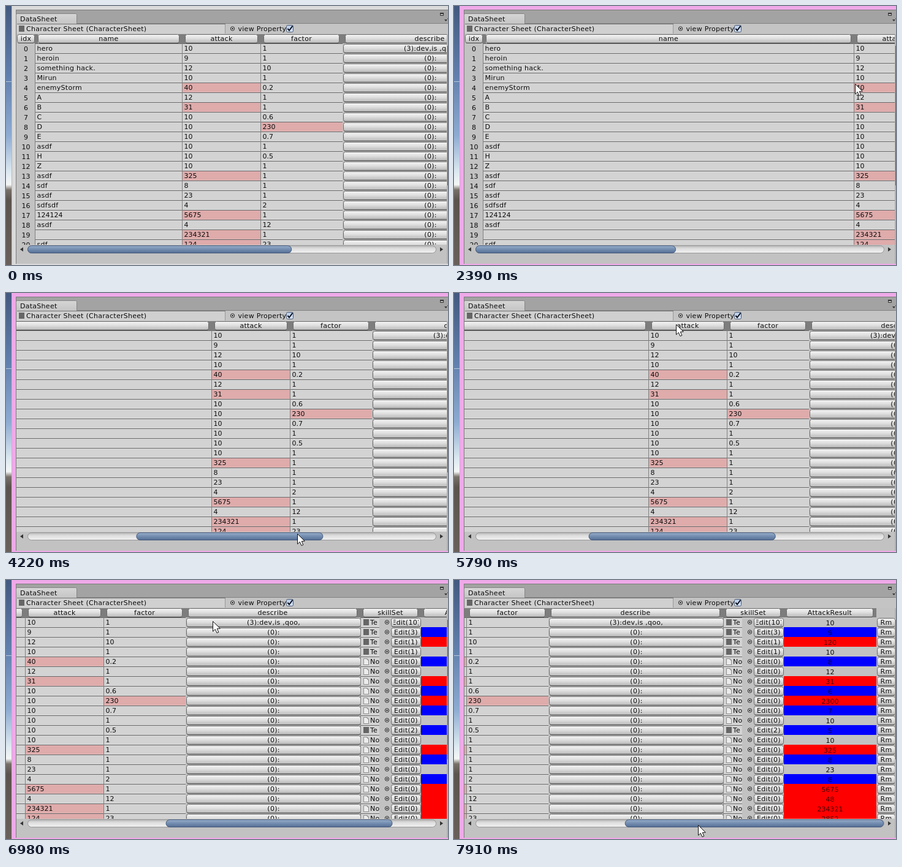
Recreate the animation shown at these times as an HTML page with a canvas. Size 721 by 423 pixels, loop 8000 ms.

```html
<!DOCTYPE html>
<html lang="en">
<head>
<meta charset="utf-8">
<title>DataSheet</title>
<style>
  html, body { margin: 0; width: 100%; height: 100%; overflow: hidden; background: #c2c2c2; }
  canvas { display: block; }
</style>
</head>
<body>
<canvas id="stage" width="721" height="423"></canvas>
<script>
const ctx = document.getElementById('stage').getContext('2d');
const LOOP = 8000, FOCUS_AT = 1400;
const VIEW = { x: 17, right: 719, top: 45, bottom: 390, w: 702 };
const ROW = 16, LIMIT = 30;
const GREY = '#c2c2c2', INK = '#0c0c0c';

// name, attack, factor, number of skills
const rows = [
  ['hero', 10, 1, 10], ['heroin', 9, 1, 3], ['something hack.', 12, 10, 1],
  ['Mirun', 10, 1, 1], ['enemyStorm', 40, 0.2, 0], ['A', 12, 1, 0],
  ['B', 31, 1, 0], ['C', 10, 0.6, 0], ['D', 10, 230, 0], ['E', 10, 0.7, 0],
  ['asdf', 10, 1, 0], ['H', 10, 0.5, 2], ['Z', 10, 1, 0], ['asdf', 325, 1, 0],
  ['sdf', 8, 1, 0], ['asdf', 23, 1, 0], ['sdfsdf', 4, 2, 0],
  ['124124', 5675, 1, 0], ['asdf', 4, 12, 0], ['', 234321, 1, 0], ['sdf', 124, 23, 0]
];

// time, extra width of the name column
const widthKeys = [
  [2000, 0], [2570, 476], [5790, 476], [6180, 239], [6830, 239], [7220, 109], [7450, 24]
];
// time, horizontal scroll
const scrollKeys = [[4000, 0], [4250, 445]];
// time, pointer x, y
const pointerKeys = [
  [0, 594, 440], [39, 594, 440], [40, 594, 391], [560, 302, 33], [810, 282, 51],
  [990, 282, 51], [1020, 284, 51], [1170, 284, 51], [1210, 277, 43], [1250, 286, 52],
  [1999, 286, 52], [2000, 289, 53], [2570, 765, 150],
  [3209, 765, 150], [3210, 697, 178], [3490, 340, 392], [3600, 318, 406], [3770, 312, 397],
  [4000, 312, 397], [4250, 496, 393], [4500, 496, 393], [4860, 300, 40],
  [5010, 300, 40], [5080, 315, 56], [5240, 315, 56], [5470, 320, 53],
  [5789, 320, 53], [5790, 363, 51], [6180, 126, 58], [6370, 387, 65],
  [6830, 387, 65], [7220, 257, 71], [7450, 172, 73], [7610, 264, 208],
  [7660, 270, 220], [7910, 398, 400]
];

const smooth = p => p * p * (3 - 2 * p);
const linear = p => p;

function sample(keys, t, ease) {
  if (t <= keys[0][0]) return keys[0].slice(1);
  const n = keys.findIndex(k => k[0] > t);
  if (n < 0) return keys[keys.length - 1].slice(1);
  const a = keys[n - 1], b = keys[n];
  const p = ease((t - a[0]) / (b[0] - a[0]));
  return a.slice(1).map((v, i) => v + (b[i + 1] - v) * p);
}

function rect(x, y, w, h, fill) {
  ctx.fillStyle = fill;
  ctx.fillRect(x, y, w, h);
}

function gradient(y, h, stops) {
  const g = ctx.createLinearGradient(0, y, 0, y + h);
  stops.forEach(([p, c]) => g.addColorStop(p, c));
  return g;
}

function box(x, y, w, h, r, fill, stroke) {
  ctx.beginPath();
  ctx.roundRect(x + .5, y + .5, w - 1, h - 1, r);
  ctx.fillStyle = fill;
  ctx.fill();
  ctx.strokeStyle = stroke;
  ctx.lineWidth = 1;
  ctx.stroke();
}

function poly(points, fill) {
  ctx.beginPath();
  points.forEach(([x, y]) => ctx.lineTo(x, y));
  ctx.closePath();
  ctx.fillStyle = fill;
  ctx.fill();
}

function text(str, x, y, align = 'left', color = INK) {
  str = String(str);
  ctx.font = '11px "DejaVu Sans", sans-serif';
  ctx.letterSpacing = /[a-z(]/i.test(str) ? '0.27px' : '0px';
  ctx.textAlign = align;
  ctx.fillStyle = color;
  ctx.fillText(str, x, y);
}

function clipped(x, y, w, h, draw) {
  ctx.save();
  ctx.beginPath();
  ctx.rect(x, y, w, h);
  ctx.clip();
  draw();
  ctx.restore();
}

function button(x, y, w, label) {
  const face = gradient(y, 15, [[0, '#f6f6f6'], [.45, '#e0e0e0'], [1, '#b4b4b4']]);
  box(x, y, w, 15, 3, face, '#6a6a6a');
  rect(x + 2, y + 14, w - 4, 1, '#454545');
  clipped(x + 4, y, w - 8, 15, () => text(label, x + w / 2, y + 11, 'center'));
}

function ring(x, y) {
  ctx.beginPath();
  ctx.arc(x, y, 3.2, 0, 7);
  ctx.strokeStyle = '#2a2a2a';
  ctx.lineWidth = 1;
  ctx.stroke();
  rect(x - 1, y - 1, 2, 2, '#111');
}

function field(x, y, w, value) {
  rect(x, y, w, ROW, value > LIMIT ? '#dfabab' : '#d3d3d3');
  rect(x, y - 1, w, 1, '#686868');
  rect(x, y + ROW - 2, w, 1, value > LIMIT ? '#e6b9b9' : '#dcdcdc');
  rect(x - 1, y - 1, 1, ROW, '#808080');
  text(value, x + 2.5, y + 11);
}

function skillCell(x, y, count) {
  field(x + 1, y, 30, '');
  if (count) rect(x + 5, y + 2, 9, 10, '#666');
  else {
    poly([[x + 5, y + 2], [x + 11, y + 2], [x + 14, y + 5], [x + 14, y + 13], [x + 5, y + 13]], '#8f8f8f');
    poly([[x + 6, y + 3], [x + 10, y + 3], [x + 13, y + 6], [x + 13, y + 12], [x + 6, y + 12]], '#ececec');
  }
  text(count ? 'Te' : 'No', x + 16, y + 11);
  rect(x + 31, y - 1, 19, ROW + 1, GREY);
  ring(x + 43.5, y + 7);
  button(x + 50, y, 49, `Edit(${count})`);
}

function resultCell(x, y, value) {
  const fill = value < 10 ? '#0000ff' : value > LIMIT ? '#ff0000' : GREY;
  const ink = value < 10 ? '#000050' : value > LIMIT ? '#480000' : INK;
  rect(x, y - 1, 151, ROW, fill);
  text(value, x + 75.5, y + 12, 'center', ink);
}

function table(extra, scroll) {
  const start = VIEW.x - scroll;
  const cols = [['name', 240 + extra], ['attack', 128], ['factor', 133],
    ['describe', 285], ['skillSet', 99], ['AttackResult', 151]];
  let x = start + 31;
  const at = {};

  rect(start + 29, 46, 6, 15, '#7d7d7d');
  button(start + 1, 46, 29, 'idx');
  cols.forEach(([label, w], i) => {
    at[label] = x;
    const last = i === cols.length - 1;
    rect(x + w - 7, 46, last ? 7 : 13, 15, '#7d7d7d');
    x += w;
  });
  cols.forEach(([label, w]) => button(at[label] + 4, 46, w - 9, label));

  rows.forEach(([name, attack, factor, skills], i) => {
    const y = 62 + i * ROW;
    text(i, start + 15.5, y + 12, 'center');
    field(at.name, y, cols[0][1], name === '124124' ? name + '\u200b' : name);
    field(at.attack, y, 128, attack);
    field(at.factor, y, 133, factor);
    button(at.describe + 1, y, 285, i ? '(0):' : '(3):dev,is ,qoo,');
    skillCell(at.skillSet, y, skills);
    resultCell(at.AttackResult, y, Math.round(attack * factor));
    button(x + 1, y, 30, 'Rm');
  });
}

function scrollbar(total, scroll) {
  const unit = 652 / total;
  box(35, 391, 667, 13, 6.5, gradient(391, 13, [[0, '#b4b4b4'], [.4, '#dedede'], [1, '#f2f2f2']]), '#979797');
  box(35 + unit * scroll, 391, 14 + unit * VIEW.w, 13, 6,
    gradient(391, 13, [[0, '#9bb0cb'], [.45, '#7690b3'], [1, '#526b91']]), '#43597c');
  poly([[23, 397.5], [28, 394], [28, 401]], '#333');
  poly([[713, 397.5], [708, 394], [708, 401]], '#333');
}

function backdrop(focused) {
  rect(0, 0, 721, 423, gradient(0, 423, [[0, '#43597f'], [.27, '#6280ad'], [.5, '#8eabd2'],
    [.64, '#dce8f0'], [.69, '#f4f6f5'], [.71, '#777069'], [.75, '#5b534e'], [1, '#69605b']]));
  rect(0, 123, 10, 1, '#b8c8dc');
  rect(9, 0, 712, 423, focused ? '#dba5dc' : '#b9b9bb');
  rect(10, 0, 711, 423, focused ? '#efa9e9' : '#dadada');
  rect(16, 6, 705, 415, '#7b7b7b');
  rect(17, 7, 704, 414, GREY);
}

function chrome() {
  rect(17, 7, 704, 22, '#a3a3a3');
  rect(17, 28, 704, 1, '#838383');
  box(16, 12, 100, 20, 2, gradient(12, 18, [[0, '#d6d6d6'], [1, '#c4c4c4']]), '#858585');
  rect(17, 29, 704, 17, '#c4c4c4');
  text('DataSheet', 23, 25);

  rect(18, 30, 339, 15, '#d0d0d0');
  rect(18, 29, 340, 1, '#757575');
  rect(357, 30, 1, 15, '#999');
  rect(21, 32, 9, 10, '#666');
  text('Character Sheet (CharacterSheet)', 33, 41);
  ring(369.5, 37);
  text('view Property', 378.5, 41);
  box(457, 31, 12, 12, 2, gradient(31, 12, [[0, '#b5c8e4'], [1, '#dce8f6']]), '#4b5a75');
  ctx.beginPath();
  [[459.5, 37], [462, 40], [467.5, 32.5]].forEach(([x, y]) => ctx.lineTo(x, y));
  ctx.strokeStyle = '#0b1020';
  ctx.lineWidth = 2;
  ctx.stroke();

  box(708, 11, 6, 5, 0, '#b5b5b5', '#333');
  rect(708, 11, 6, 2, '#333');
  poly([[715, 22], [720, 22], [717.5, 25]], '#333');
  rect(720, 20, 1, 1, '#333');
}

function pointer(x, y) {
  ctx.beginPath();
  [[0, 0], [0, 16.5], [3.8, 13], [6.5, 19], [9.3, 17.8], [6.8, 12], [11.8, 11.7]]
    .forEach(([dx, dy]) => ctx.lineTo(x + .5 + dx, y + .5 + dy));
  ctx.closePath();
  ctx.fillStyle = '#fff';
  ctx.fill();
  ctx.strokeStyle = '#111';
  ctx.lineWidth = 1;
  ctx.stroke();
}

function draw(t) {
  const [extra] = sample(widthKeys, t, t < 3000 ? smooth : linear).map(Math.round);
  const total = 1097 + extra;
  const [wanted] = sample(scrollKeys, t, smooth).map(Math.round);
  const scroll = Math.min(wanted, total - VIEW.w);

  backdrop(t >= FOCUS_AT);
  chrome();
  clipped(VIEW.x, VIEW.top, VIEW.w, VIEW.bottom - VIEW.top, () => table(extra, scroll));
  scrollbar(total, scroll);
  rect(719, 46, 2, 375, '#b0b0b0');
  rect(720, 65, 1, 228, '#4b668f');
  pointer(...sample(pointerKeys, t, t > 2000 && t < 2570 ? smooth : linear).map(Math.round));
}

const began = performance.now();
function tick() {
  draw((performance.now() - began) % LOOP);
  requestAnimationFrame(tick);
}
tick();
</script>
</body>
</html>
```
